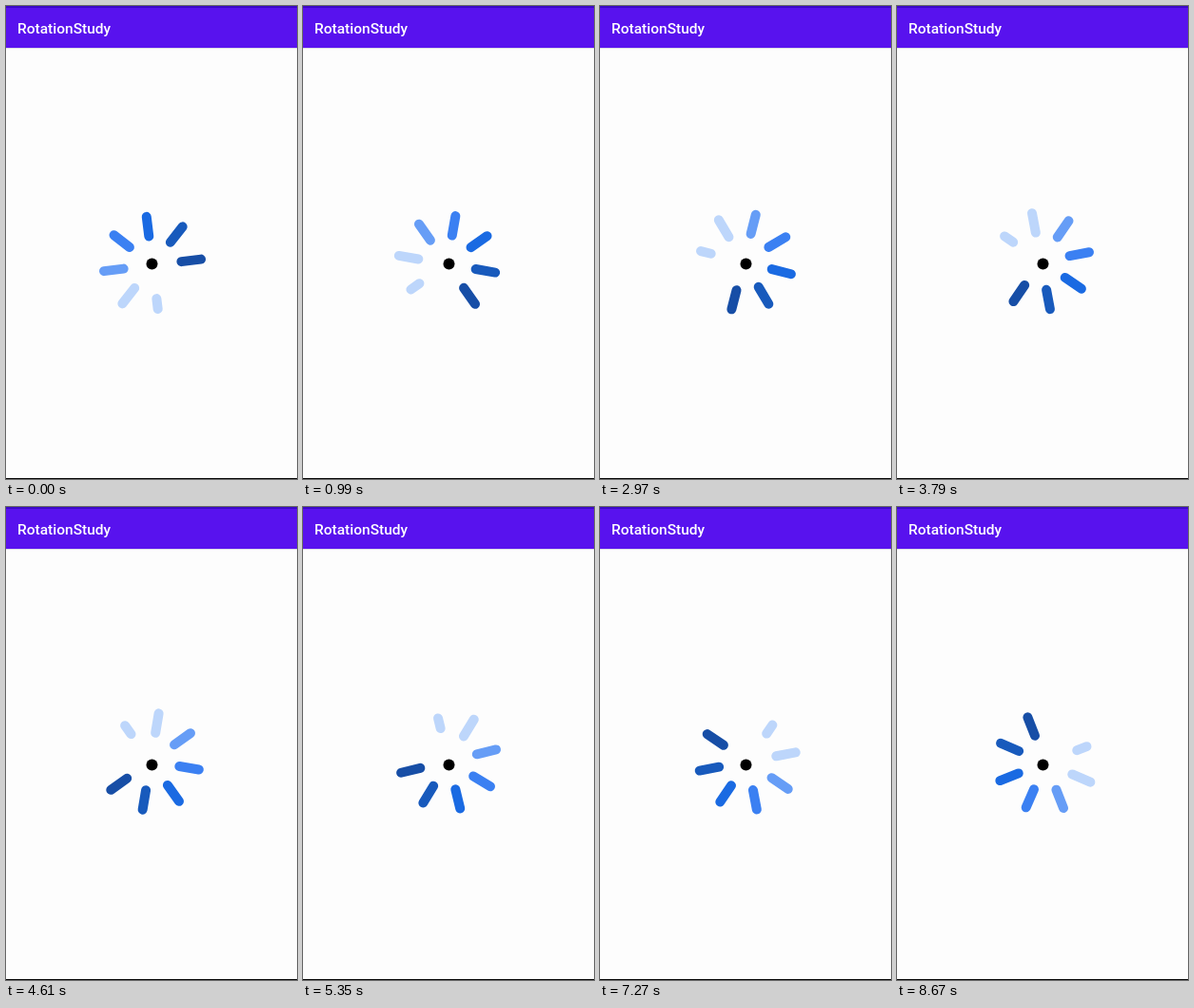
Recreate the animation shown at these times as an HTML page. Size 306x498 px, loop 8.77 s.

```html
<!DOCTYPE html>
<html lang="en">
<head>
<meta charset="utf-8">
<title>Spinner</title>
<style>
  html, body { margin: 0; width: 100%; height: 100%; overflow: hidden; background: #fdfdfd; }
  svg { display: block; width: 100vw; height: 100vh; }
  text { font: 500 15.5px Roboto, "Open Sans", sans-serif; fill: #fff; }
  line { stroke-width: 10; stroke-linecap: round; }
</style>
</head>
<body>
<svg viewBox="0 0 306 498">
  <rect width="306" height="498" fill="#fdfdfd"/>
  <rect width="306" height="45" fill="#dcdce4"/>
  <rect width="306" height="44" fill="#5812ee"/>
  <rect width="306" height="2" fill="#3c08c8"/>
  <text x="12" y="29">RotationStudy</text>
  <rect y="497" width="306" height="1" fill="#080808"/>
  <g id="spinner"></g>
  <circle cx="153.5" cy="271.5" r="6" fill="#000"/>
</svg>
<script>
const LOOP = 8770;
const PIVOT = { x: 153.7, y: 270.2 };
const WOBBLE = 2.7;           // the ring's centre sits slightly off the pivot
const RING = 41;
const STEP_ANGLE = 1.18;
const STALL = 260, RESUME = 410, LAST = 8670;
// Pace after the stall: [step, angle]
const PACE = [[0, 40], [56, 104.3], [90, 144.5], [123, 186.8], [177, 248.5]];
const COLORS = ["#174ea6", "#185abc", "#1a6ae2", "#3b80f2", "#669df6", "#bdd6fb", "#bdd6fb"];
const spinner = document.getElementById("spinner");

COLORS.forEach((color, i) => {
  const half = i === COLORS.length - 1 ? 5.5 : 10.4;
  const bar = document.createElementNS("http://www.w3.org/2000/svg", "line");
  const attrs = {
    x1: RING - half, x2: RING + half, y1: 0, y2: 0,
    stroke: color, transform: `rotate(${-45 * i})`
  };
  for (const name in attrs) bar.setAttribute(name, attrs[name]);
  spinner.append(bar);
});

// Steps come in threes: 20, 20 and 100 ms.
const steps = t => 3 * Math.floor(t / 140) + Math.min(2, Math.floor(t % 140 / 20));

function interpolate(points, x) {
  const i = Math.max(1, points.findIndex(p => p[0] >= x));
  const [x0, y0] = points[i - 1], [x1, y1] = points[i];
  return y0 + (y1 - y0) * (x - x0) / (x1 - x0);
}

// The turn stalls briefly, then skips ahead.
function angleAt(t) {
  if (t < RESUME) return -7 + STEP_ANGLE * (steps(Math.min(t, STALL) + 20) - 1);
  return interpolate(PACE, steps(Math.min(t, LAST) - RESUME));
}

function draw(t) {
  spinner.setAttribute("transform",
    `translate(${PIVOT.x} ${PIVOT.y}) rotate(${angleAt(t)}) translate(0 ${WOBBLE})`);
}

const start = performance.now();
function tick() {
  draw((performance.now() - start) % LOOP);
  requestAnimationFrame(tick);
}
tick();
</script>
</body>
</html>
```
